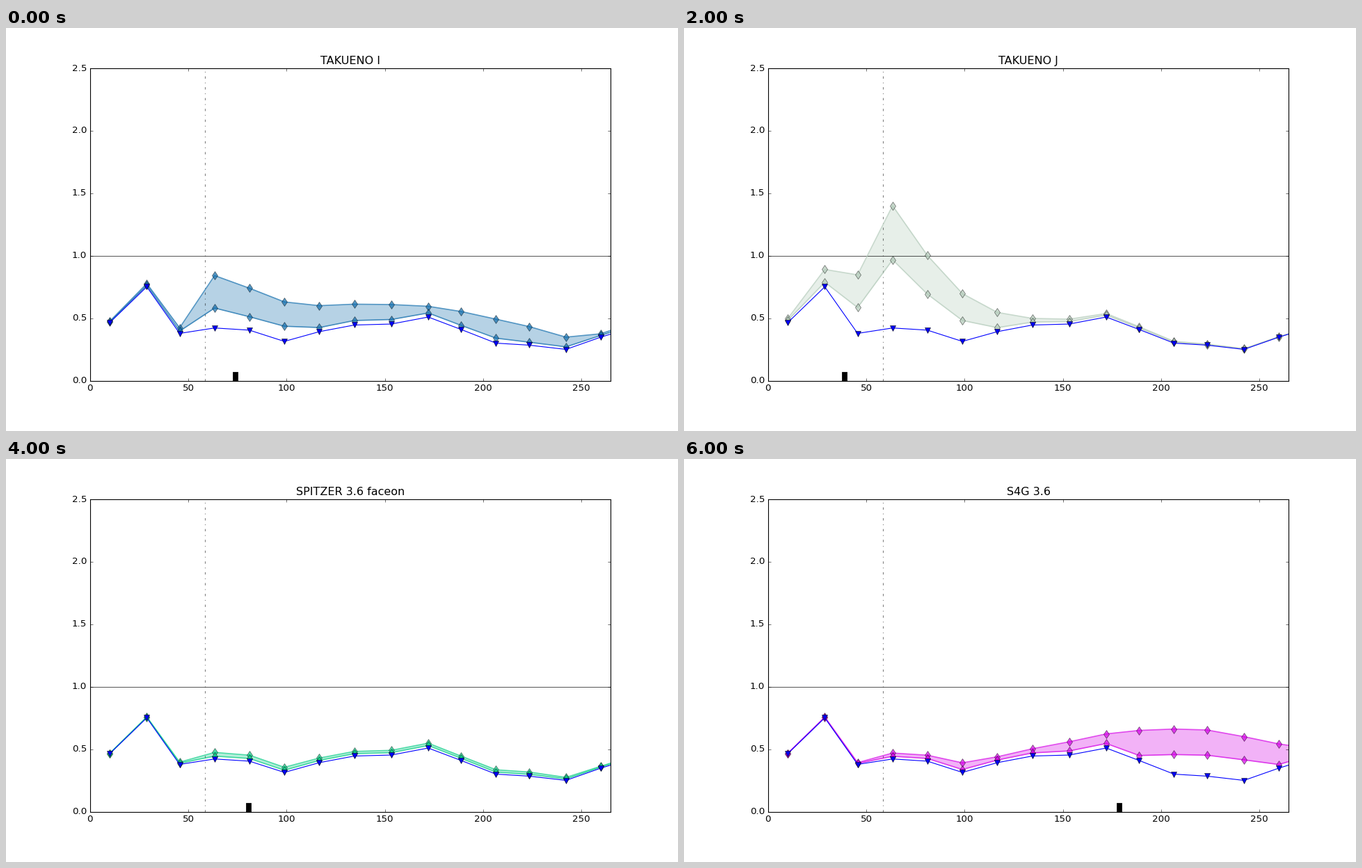
A matplotlib script for the animation above (7000 ms loop, 966 px wide and 580 px high).

```python
import numpy as np
import matplotlib.pyplot as plt
from matplotlib.animation import FuncAnimation

W, H, DPI = 966, 580, 80

plt.style.use("classic")
plt.rcParams.update({
    "font.family": "DejaVu Sans",
    "figure.facecolor": "white",
    "savefig.dpi": "figure",
})

radius = np.array([10.1, 28.9, 45.6, 63.4, 81.1, 98.9, 116.7, 134.5,
                   153.3, 172.1, 188.9, 206.6, 223.4, 242.2, 259.9, 277.7])
base = np.array([.465, .751, .378, .4215, .404, .314, .392, .445,
                 .453, .509, .409, .300, .284, .250, .348, .434])

# Height of the lower edge above the base curve where it levels off
floor_gain = np.full(radius.size, .085)
floor_gain[1:3] = .062, .078
BAND_RATIO = 1.447

# title, colour, scale length, upper edge of the band
models = [
    ("TAKUENO I", (15, 108, 172), 74.1,
     [.4755, .777, .4225, .841, .740, .630, .600, .612,
      .609, .595, .553, .492, .433, .348, .375, .470]),
    ("TAKUENO V", (22, 8, 192), 78.6,
     [.4766, .784, .470, .959, .854, .734, .709, .729,
      .736, .726, .685, .620, .548, .442, .389, .471]),
    ("TAKUENO J", (178, 202, 185), 39.0,
     [.498, .890, .8465, 1.400, 1.002, .697, .546, .498,
      .492, .537, .431, .314, .292, .256, .351, .436]),
    ("SPITZER 3.6", (235, 108, 62), 80.7,
     [.478, .789, .546, 1.121, 1.002, .869, .843, .869,
      .880, .873, .830, .760, .674, .548, .448, .487]),
    ("SPITZER 3.6 faceon", (10, 205, 135), 80.7,
     [.467, .759, .396, .474, .452, .355, .429, .482,
      .4905, .548, .444, .335, .317, .274, .363, .453]),
    ("GALFIT K", (55, 138, 155), 146.0,
     [.470, .770, .409, .766, .752, .714, .7575, .859,
      .955, 1.041, 1.086, 1.096, 1.062, .954, .836, .7425]),
    ("S4G 3.6", (212, 0, 230), 178.9,
     [.467, .757, .392, .469, .4515, .3905, .439, .503,
      .559, .622, .650, .661, .6535, .600, .542, .501]),
]


def lower_edge(upper):
    excess = upper / base - 1
    floor = base * (1 + floor_gain * (1 - np.exp(-excess / .12)))
    return np.maximum(upper / BAND_RATIO, floor)


fig = plt.figure(figsize=(W / DPI, H / DPI), dpi=DPI)
ax = fig.add_axes([.125, .125, .775, .775])


def draw(i):
    title, rgb, scale, upper = models[i]
    color = tuple(c / 255 for c in rgb)
    upper = np.array(upper)
    lower = lower_edge(upper)

    ax.clear()
    ax.axhline(1, color="k", lw=.6)
    ax.axvline(58.6, color="k", ls="-.", alpha=.5)
    ax.axvline(scale, ymax=.02, color="k", lw=7)
    ax.fill_between(radius, lower, upper, color=color, alpha=.3, lw=0)
    for edge in (upper, lower):
        ax.plot(radius, edge, "d-", color=color, alpha=.7, lw=1.5, ms=8)
    ax.plot(radius, base, "v-", color="b", lw=1, ms=7)

    ax.set_xlim(0, 265)
    ax.set_ylim(0, 2.5)
    ax.set_xticks(range(0, 251, 50))
    ax.set_yticks(np.arange(0, 2.6, .5))
    ax.set_title(title)
    return ax.get_children()


anim = FuncAnimation(fig, draw, frames=len(models), init_func=lambda: draw(0),
                     interval=1000, repeat=True, repeat_delay=0, blit=False)
plt.show()
```
